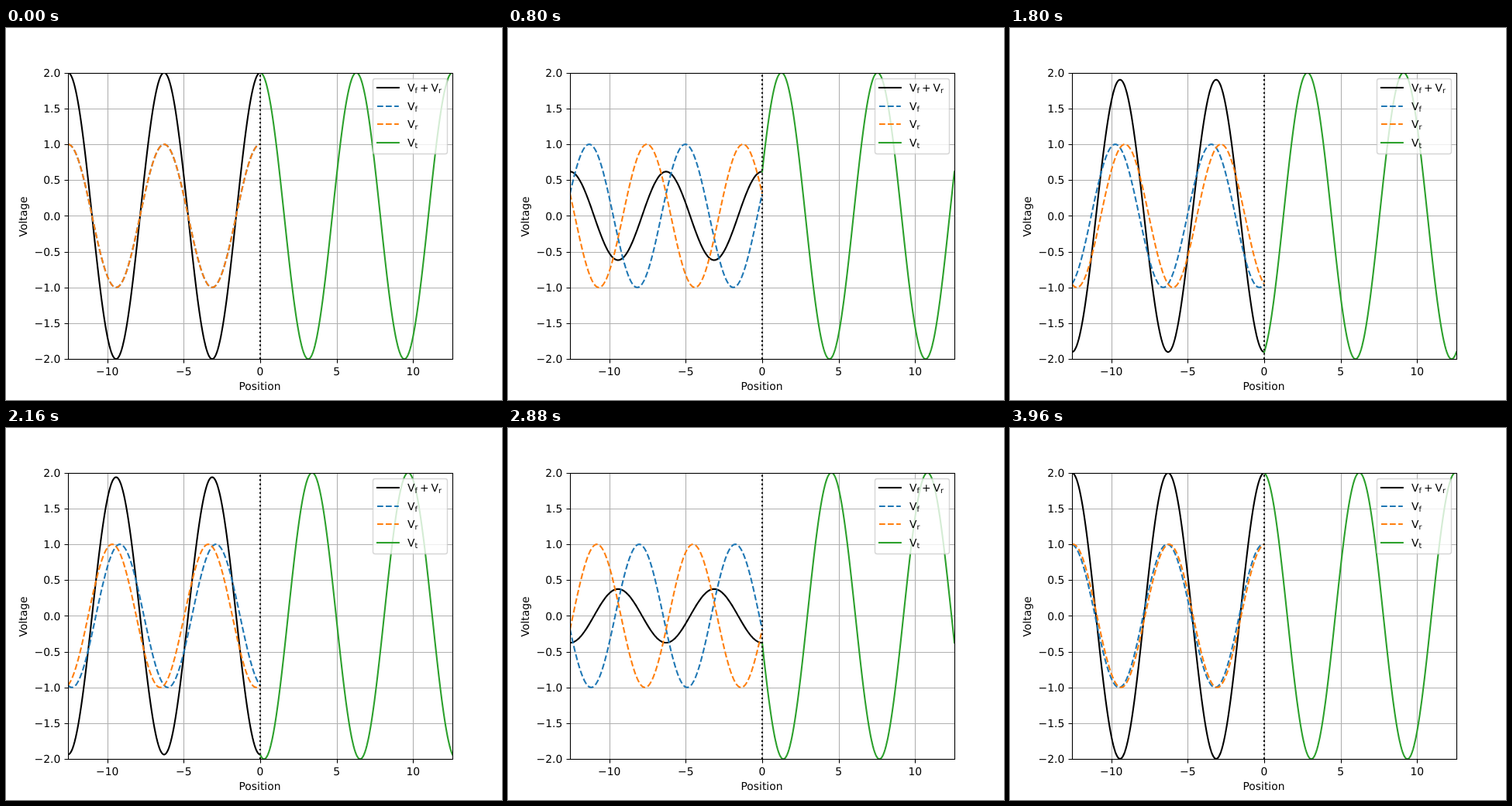
Recreate the animation shown at these times as an HTML page. Size 640 px wide and 480 px high, loop 4 s.

```html
<!DOCTYPE html>
<html lang="en">
<head>
<meta charset="utf-8">
<title>Standing wave</title>
<style>
  html, body { margin: 0; width: 100%; height: 100%; overflow: hidden; background: #fff; }
  svg { display: block; width: 640px; height: 480px; }
  text { font: 13.889px "DejaVu Sans", sans-serif; text-rendering: geometricPrecision; }
  .mid { text-anchor: middle; }
  .end { text-anchor: end; }
  .math { font-style: italic; }
  .sub { font-size: 9.722px; }
  .plus { font-style: normal; }
  .grid { stroke: #b0b0b0; stroke-width: 1.111; }
  .axis { fill: none; stroke: #000; stroke-width: 1.111; }
  .line { fill: none; stroke-width: 2.083; stroke-linecap: square; stroke-linejoin: round; }
  .dash { stroke-dasharray: 7.708 3.333; stroke-linecap: butt; }
  .dots { stroke-dasharray: 2.083 3.4375; stroke-linecap: butt; }
  .sum { stroke: #000; }
  .fwd { stroke: #1f77b4; }
  .ref { stroke: #ff7f0e; }
  .out { stroke: #2ca02c; }
</style>
</head>
<body>
<svg viewBox="0 0 640 480">
  <clipPath id="plot"><rect x="80" y="58" width="497" height="370"/></clipPath>
  <path id="grid" class="grid"/>
  <path id="ticks" class="axis"/>
  <g clip-path="url(#plot)">
    <path id="sum" class="line sum"/>
    <path id="fwd" class="line dash fwd"/>
    <path id="ref" class="line dash ref"/>
    <path id="out" class="line out"/>
    <path class="line dots sum" d="M328 427V58"/>
  </g>
  <rect class="axis" x="80.5" y="58.5" width="496" height="369"/>
  <g id="labels">
    <text class="mid" x="327.5" y="467">Position</text>
    <text class="mid" transform="translate(27 243.5) rotate(-90)">Voltage</text>
  </g>
  <rect x="473.5" y="65.5" width="96" height="97" rx="2.78" fill="#fff" stroke="#ccc"
        stroke-width="1.389" opacity=".8"/>
  <path class="line sum" d="M479 77h27.8"/>
  <path class="line dash fwd" d="M479 101h27.8"/>
  <path class="line dash ref" d="M479 124h27.8"/>
  <path class="line out" d="M479 148h27.8"/>
  <g id="legend" class="math"></g>
</svg>
<script>
  const LOOP = 4000, STEP = 40, SPAN = 4 * Math.PI, SAMPLES = 200;
  const byId = id => document.getElementById(id);
  const toX = x => 328 + x * 248 / SPAN;
  const toY = y => 242.4 - y * 92.4;
  const snap = v => Math.round(v) + 0.5;
  const signed = s => String(s).replace('-', '\u2212');

  function addText(parent, content, x, y, cls) {
    const node = document.createElementNS('http://www.w3.org/2000/svg', 'text');
    node.setAttribute('x', x);
    node.setAttribute('y', y);
    node.setAttribute('class', cls);
    node.textContent = content;
    parent.append(node);
  }

  function drawAxes() {
    let grid = '', ticks = '';
    for (let v = -10; v <= 10; v += 5) {
      const x = snap(toX(v));
      grid += `M${x} 58V427`;
      ticks += `M${x} 427.5v5`;
      addText(byId('labels'), signed(v), toX(v), 448, 'mid');
    }
    for (let v = -2; v <= 2; v += 0.5) {
      const y = snap(toY(v));
      grid += `M80 ${y}H576`;
      ticks += `M75.5 ${y}h5`;
      addText(byId('labels'), signed(v.toFixed(1)), 70.3, Math.round(toY(v) + 5.1), 'end');
    }
    byId('grid').setAttribute('d', grid);
    byId('ticks').setAttribute('d', ticks);
  }

  function addSymbol(index, x, y) {
    addText(byId('legend'), 'V', x, y, '');
    addText(byId('legend'), index, x + 9.5, y + 2.3, 'sub');
  }

  function drawLegend() {
    addSymbol('f', 517.9, 82);
    addText(byId('legend'), '+', 534, 82, 'plus');
    addSymbol('r', 548.4, 82);
    addSymbol('f', 517.9, 106);
    addSymbol('r', 517.9, 129);
    addSymbol('t', 517.9, 153);
  }

  function plot(id, start, wave) {
    const points = Array.from({ length: SAMPLES + 1 }, (_, i) => {
      const x = start + SPAN * i / SAMPLES;
      return toX(x).toFixed(3) + ' ' + toY(wave(x)).toFixed(3);
    });
    byId(id).setAttribute('d', 'M' + points.join('L'));
  }

  function render(time) {
    const phase = 2 * Math.PI * Math.floor(time % LOOP / STEP) * STEP / LOOP;
    const forward = x => Math.cos(x - phase);
    const reflected = x => Math.cos(x + phase);
    plot('sum', -SPAN, x => forward(x) + reflected(x));
    plot('fwd', -SPAN, forward);
    plot('ref', -SPAN, reflected);
    plot('out', 0, x => 2 * forward(x));
  }

  function tick(now) {
    render(now);
    requestAnimationFrame(tick);
  }

  drawAxes();
  drawLegend();
  render(0);
  requestAnimationFrame(tick);
</script>
</body>
</html>
```
